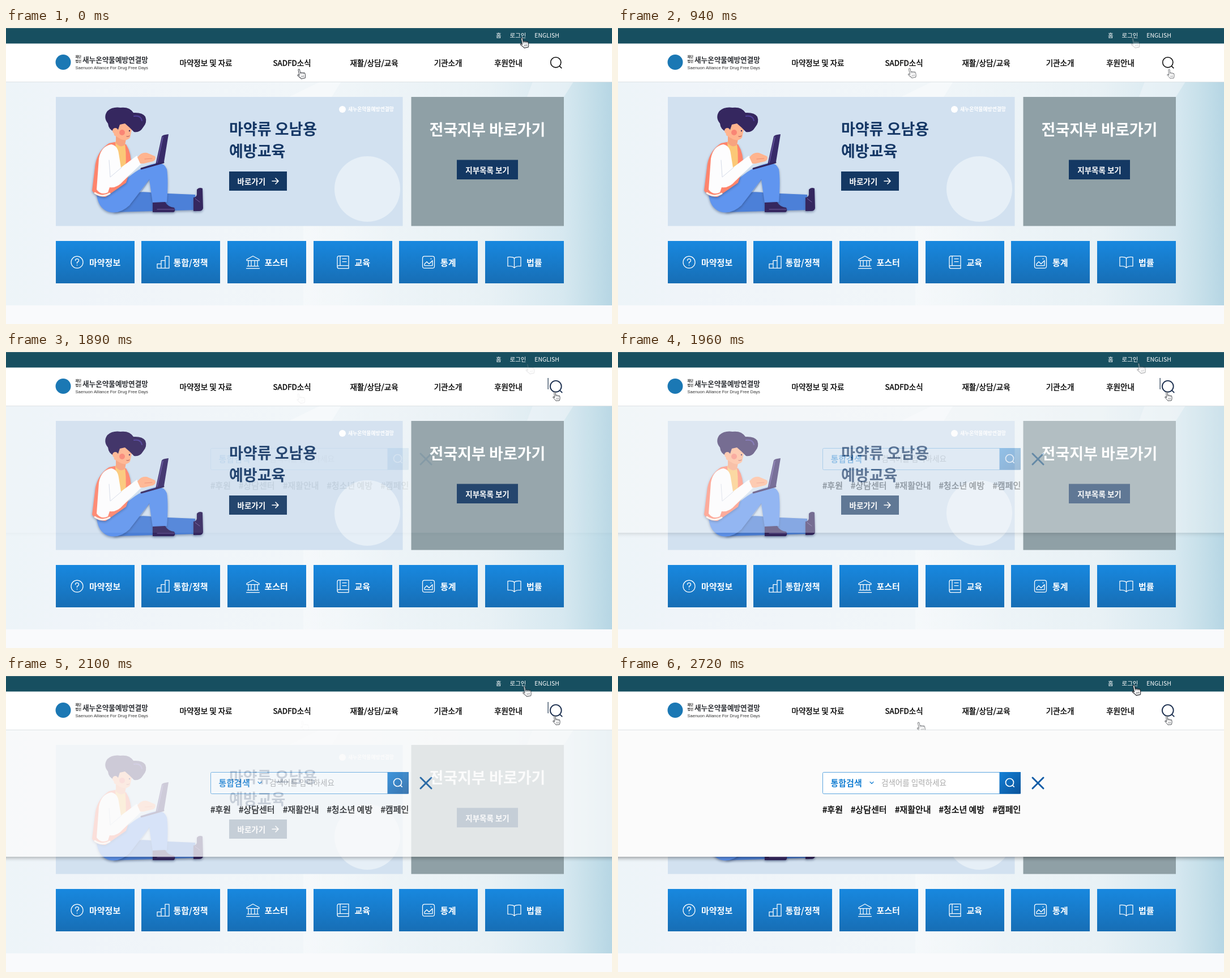
Write an HTML page with a canvas that moves like this. It is 1070 by 524 pixels and loops after 2.79 s.

```html
<!DOCTYPE html>
<html lang="ko">
<head>
<meta charset="utf-8">
<title>통합검색</title>
<style>
  html, body { margin: 0; width: 100%; height: 100%; overflow: hidden; background: #f9fafc; }
  canvas { display: block; width: 1070px; height: 524px; }
</style>
</head>
<body>
<canvas id="stage" width="1070" height="524"></canvas>
<script>
const W = 1070, H = 524, LOOP = 2790;
const FONT = '"Noto Sans CJK KR", "Noto Sans KR", "Noto Sans CJK JP", "Noto Sans", sans-serif';
const NAVY = '#163866';
const ORG = '새누온약물예방연결망';

function layer() {
  const c = document.createElement('canvas');
  c.width = W;
  c.height = H;
  return c.getContext('2d');
}

// Text placed by the vertical middle of its Hangul glyphs.
function label(g, text, x, midY, size, color, weight = 500, align = 'left', family = FONT) {
  const y = midY + size * 0.38;
  g.font = `${weight} ${size}px ${family}`;
  g.textAlign = align;
  g.textBaseline = 'alphabetic';
  g.fillStyle = color;
  g.fillText(text, x, y);
  if (weight === 500) {
    // A hairline thickens regular glyphs to a medium weight.
    g.strokeStyle = color;
    g.lineWidth = size * 0.028;
    g.lineJoin = 'round';
    g.strokeText(text, x, y);
  }
}

function rect(g, x, y, w, h, color) {
  g.fillStyle = color;
  g.fillRect(x, y, w, h);
}

function fill(g, d, color) {
  g.fillStyle = color;
  g.fill(new Path2D(d));
}

function stroke(g, d, color, width) {
  g.strokeStyle = color;
  g.lineWidth = width;
  g.lineCap = g.lineJoin = 'round';
  g.stroke(new Path2D(d));
}

function disc(g, x, y, r, color) {
  g.fillStyle = color;
  g.beginPath();
  g.arc(x, y, r, 0, Math.PI * 2);
  g.fill();
}

function gradient(g, x0, y0, x1, y1, colors) {
  const grad = g.createLinearGradient(x0, y0, x1, y1);
  colors.forEach(([at, color]) => grad.addColorStop(at, color));
  return grad;
}

function magnifier(g, x, y, r, color, width) {
  const k = r * 0.72, end = r * 1.1;
  stroke(g, `M${x + r} ${y}A${r} ${r} 0 1 1 ${x - r} ${y}A${r} ${r} 0 1 1 ${x + r} ${y}
    M${x + k} ${y + k}L${x + end} ${y + end}`, color, width);
}

function drawBackdrop(g) {
  rect(g, 0, 0, W, H, '#f9fafc');
  rect(g, 0, 95, W, 396, gradient(g, 0, 0, W, 0, [
    [0, '#edf4f8'], [0.1, '#eff4f9'], [0.5, '#f1f6f9'], [0.8, '#e8f1f5'],
    [0.92, '#d6e8f0'], [0.96, '#c7e0ea'], [1, '#b6d6e4']
  ]));
  fill(g, 'M500 122L555 95H592L575 122z', 'rgba(255,255,255,.35)');
  fill(g, 'M930 95H1002L985 122H920z', 'rgba(240,246,249,.55)');
  rect(g, 525, 350, 165, 141, gradient(g, 525, 0, 690, 0,
    [[0, 'rgba(255,255,255,.3)'], [1, 'rgba(255,255,255,0)']]));
}

function drawHeader(g) {
  rect(g, 0, 27, W, 68, '#fff');
  rect(g, 0, 0, W, 27.5, '#174f60');
  rect(g, 0, 0, W, 1, '#456f7c');
  label(g, '홈', 865, 13.3, 10.5, '#fff', 400);
  label(g, '로그인', 889.5, 13.3, 10.5, '#fff', 400);
  label(g, 'ENGLISH', 933.3, 13, 10.5, '#fff', 400);

  rect(g, 0, 95, W, 1, '#dde2e5');
  disc(g, 101, 60.5, 13.5, '#1b78b4');
  label(g, '재단', 122.5, 51, 5.8, '#333', 700);
  label(g, '법인', 122.5, 58.5, 5.8, '#333', 700);
  label(g, ORG, 135, 56, 12.6, '#303338', 700);
  label(g, 'Saenuon Alliance For Drug Free Days', 122.5, 70.3, 7.6, '#333', 400, 'left',
    '"Liberation Sans", Arial, sans-serif');

  const menu = [['마약정보 및 자료', 353], ['SADFD소식', 505], ['재활/상담/교육', 650],
    ['기관소개', 780.5], ['후원안내', 887]];
  menu.forEach(([text, x]) => label(g, text, x, 62, 13.5, '#000', 500, 'center'));
}

function drawPerson(g) {
  const skin = '#ffb48f', hair = '#35275f', leg = '#6095ef', white = '#fdfdfe', coral = '#ff846c';
  g.save();
  g.shadowColor = 'rgba(50,70,110,.5)';
  g.shadowBlur = 4;
  g.shadowOffsetY = 2;
  fill(g, 'M196 300Q230 286 262 292L334 295L336 322L190 326z', '#4c80d8');
  fill(g, 'M331 300Q336 300 337 295V286Q341 281 347 284L348 319Q347 324 341 324H331z', hair);
  fill(g, `M160 293Q162 318 180 325Q200 331 218 314L253 268L259 310L284 308
    Q287 270 284 250Q278 236 262 240Q235 246 210 270L180 288z`, leg);
  fill(g, 'M259 309L281 308Q286 317 297 318Q300 324 296 326H259z', hair);
  fill(g, `M182 204Q163 216 158 240L152 288Q160 300 176 299L212 274
    L221 246Q222 222 212 206L192 202z`, coral);
  g.restore();

  fill(g, 'M193 201L210 204Q214 235 209 266L197 264z', '#fbc877');
  fill(g, 'M194 187L213 191L210 207Q202 213 194 204z', '#f7a37f');
  fill(g, 'M188 168H219L222 180L219 194Q213 201 203 197L191 190z', skin);
  fill(g, `M190 183Q181 179 180 169Q171 158 179 147Q188 139 202 141Q218 139 225 150
    Q241 149 246 157Q250 167 242 176Q236 186 226 184L218 176L210 169L201 171L198 180z`, hair);
  stroke(g, 'M226 156Q238 154 240 164', '#50409a', 2);
  disc(g, 193, 182, 5, skin);
  disc(g, 205, 185, 5, '#f98575');
  disc(g, 218, 182, 1.2, hair);
  stroke(g, 'M213 192Q216 193 218 191', '#a94b4d', 1);

  fill(g, `M186 206Q168 209 164 231L160 286Q168 297 180 291L183 282
    Q196 284 207 271L239 240L231 226L203 247L199 222Q197 208 186 206z`, white);
  stroke(g, 'M182 234L184 264L204 247', '#d5dbe8', 1);
  stroke(g, 'M157 292Q170 301 183 293', '#fff0e9', 3);
  fill(g, 'M232 229Q239 219 249 221L263 227Q266 232 260 236L243 240L237 240z', skin);
  stroke(g, 'M245 232L258 231', '#ee8e74', 1);

  fill(g, 'M275 192Q276 189 287 188L279 237L264 242z', '#382b69');
  stroke(g, 'M277 193L267 238', '#6555a0', 1.5);
  stroke(g, 'M239 249L278 238', '#33265f', 3);
  stroke(g, 'M253 268Q238 293 220 312', 'rgba(42,91,184,.35)', 1);
  stroke(g, 'M267 321L297 321M334 302L342 308', '#7563a2', 1);
}

function drawBanner(g) {
  g.save();
  g.beginPath();
  g.rect(88, 122, 612.5, 228.5);
  g.clip();
  rect(g, 88, 122, 613, 229, '#d2e1f0');
  disc(g, 638, 285, 58, '#e6eff7');
  drawPerson(g);
  g.restore();

  disc(g, 594, 144, 6, '#fff');
  label(g, ORG, 604, 143.5, 8.8, '#fff', 700);
  label(g, '마약류 오남용', 394, 179, 27, NAVY, 700);
  label(g, '예방교육', 394, 218, 27, NAVY, 700);
  rect(g, 394, 254, 102, 34, '#143863');
  label(g, '바로가기', 408.5, 272, 13.5, '#fff', 700);
  stroke(g, 'M470 271H481M476 266L481 271L476 276', '#fff', 1.6);

  rect(g, 715.5, 122, 269.5, 228.5, '#8fa0a6');
  label(g, '전국지부 바로가기', 850, 180, 27, '#fff', 700, 'center');
  rect(g, 796, 233.5, 108, 34.5, '#143863');
  label(g, '지부목록 보기', 850, 251.5, 13.5, '#fff', 700, 'center');
}

function drawTiles(g) {
  const tiles = [
    ['마약정보', 125.5, 147, 'M10.5 0A10.5 10.5 0 1 1 -10.5 0A10.5 10.5 0 1 1 10.5 0M-3 -3Q-3 -6 0 -6T3 -3Q3 -1 0 0V2M0 5V5.3'],
    ['통합/정책', 277.5, 295.5, 'M-10.5 10.5V3H-3.5V10.5M-3.5 3V-3H3.5V10.5M3.5 -3V-10.5H10.5V10.5H-10.5'],
    ['포스터', 436, 456.5, 'M-11 -5L0 -11L11 -5V-3H-11zM-8 -3V7M-3 -3V7M3 -3V7M8 -3V7M-10 7H10M-11.5 11H11.5'],
    ['교육', 595, 615.5, 'M-7 -11H10V11H-7Q-10 11 -10 8V-8Q-10 -11 -7 -11zM-5 -11V6M-10 8Q-10 6 -7 6H10M-1 -6H6M-1 -1H6'],
    ['통계', 746, 767, 'M-7 -10.5H7Q10.5 -10.5 10.5 -7V7Q10.5 10.5 7 10.5H-7Q-10.5 10.5 -10.5 7V-7Q-10.5 -10.5 -7 -10.5zM-7 6V3L-3 -1L1 3L7 -3V6zM4 -6H5'],
    ['법률', 897.5, 919, 'M0 -7Q-3 -10 -11.5 -9V7Q-3 6 0 10Q3 6 11.5 7V-9Q3 -10 0 -7zV10']
  ];
  tiles.forEach(([text, iconX, textX, icon], i) => {
    const left = Math.round(87.7 + i * 151.6);
    rect(g, left, 377, 139, 75,
      gradient(g, 0, 377, 0, 452, [[0, '#1888df'], [1, '#176eb5']]));
    g.save();
    g.translate(iconX, 414.7);
    stroke(g, icon, '#fff', 1.25);
    g.restore();
    label(g, text, textX, 415.7, 15, '#fff', 700);
  });
}

function drawSearchPanel(g) {
  g.save();
  g.beginPath();
  g.rect(0, 96, W, 250);
  g.clip();
  g.shadowColor = 'rgba(0,0,0,.4)';
  g.shadowBlur = 7;
  g.shadowOffsetY = 2;
  rect(g, -20, 80, W + 40, 240, '#fbfbfb');
  g.restore();

  g.beginPath();
  g.roundRect(361.5, 170.5, 349, 38, 2);
  g.fillStyle = '#fff';
  g.fill();
  g.strokeStyle = '#5ba5df';
  g.lineWidth = 1;
  g.stroke();
  rect(g, 673.5, 170, 37.5, 38.5,
    gradient(g, 674, 170, 711, 208, [[0, '#1380d7'], [1, '#0a5299']]));
  magnifier(g, 691.5, 188.5, 7, '#fff', 1.7);
  label(g, '통합검색', 375.5, 189.5, 15, '#1780d3', 700);
  stroke(g, 'M445 187.5L448 190.5L451 187.5', '#1780d3', 1.2);
  label(g, '검색어를 입력하세요', 465, 189, 13.5, '#aaa', 400);
  stroke(g, 'M732 180L751 199M751 180L732 199', '#0e5ca6', 3);

  const tags = [['#후원', 361], ['#상담센터', 411], ['#재활안내', 489],
    ['#청소년 예방', 566.5], ['#캠페인', 661.5]];
  tags.forEach(([text, x]) => label(g, text, x, 236, 15, '#000'));
}

const HAND = `M3.2 12V1.6Q3.2 0 4.6 0T6 1.6V7.4Q8.2 6.2 9 8Q11 7 11.9 8.8Q14.5 8 14.5 11
  V13.5Q14.5 16 13 18.8H5.6Q4.5 16.4 2 14L.2 11.6Q-.2 9.6 1.4 10z`;
const KNUCKLES = 'M6 7.4V10M9 8V10.4M11.9 8.8V11M7 13.5V16M9.2 13.5V16M11.4 13.5V16';

function hand(g, [x, y, alpha], scale, tilt, width) {
  if (alpha <= 0) return;
  g.save();
  g.globalAlpha = alpha;
  g.translate(x, y);
  g.rotate(tilt);
  g.scale(scale, scale);
  g.translate(-4.6, 0);
  fill(g, HAND, '#fff');
  stroke(g, HAND, '#1c1f26', width);
  stroke(g, KNUCKLES, '#1c1f26', width * 0.6);
  g.restore();
}

// Keys are [time, ...values], interpolated linearly.
function track(keys, t) {
  if (t <= keys[0][0]) return keys[0].slice(1);
  for (let i = 1; i < keys.length; i++) {
    const a = keys[i - 1], b = keys[i];
    if (t < b[0]) {
      const p = (t - a[0]) / (b[0] - a[0]);
      return a.slice(1).map((v, k) => v + (b[k + 1] - v) * p);
    }
  }
  return keys[keys.length - 1].slice(1);
}

const LOGIN = [[0, 910.5, 17.5, 0.88], [270, 909.5, 17.3, 0.75], [600, 908.5, 17.3, 0.45],
  [1200, 908.5, 17.5, 0.07], [1889, 908.5, 17.5, 0.05], [1890, 920.5, 21, 0.1],
  [1960, 919, 20, 0.35], [2100, 915, 18.5, 0.65], [2380, 911, 17, 0.92], [2720, 910.5, 16.5, 1]];
const NEWS = [[0, 517, 73, 0.85], [270, 515, 71.8, 0.95], [600, 514.5, 71.5, 0.9],
  [1200, 514.5, 71.5, 0.38], [1410, 514.5, 71.5, 0.2], [1690, 515, 73, 0.07],
  [1890, 516, 74, 0.05], [1960, 517, 76, 0], [2440, 537, 89, 0.08], [2720, 530.5, 82, 0.6]];
const SEARCH = [[600, 982, 79, 0], [800, 977, 76, 0.5], [1070, 969, 70.5, 1]];
const PANEL = [[1820, 0], [1890, 0.07], [1960, 0.33], [2100, 0.77], [2240, 0.94], [2380, 1]];

function hold(t) {
  if (t < 1270) return Math.floor(t * 3 / 200 + 0.05) * 200 / 3;
  if (t < 1410) return 1200;
  if (t < 1690) return 1410;
  if (t < 1890) return 1690;
  return 1890 + Math.floor((t - 1890) / 70 + 0.15) * 70;
}

const page = layer(), panel = layer();
[drawBackdrop, drawHeader, drawBanner, drawTiles].forEach(draw => draw(page));
drawSearchPanel(panel);
const stage = document.getElementById('stage').getContext('2d');

function render(time) {
  const t = hold(time);
  stage.globalAlpha = 1;
  stage.drawImage(page.canvas, 0, 0);
  const [shown] = track(PANEL, t);
  if (shown > 0) {
    stage.globalAlpha = shown;
    stage.drawImage(panel.canvas, 0, 0);
    stage.globalAlpha = 1;
  }

  const hover = Math.min(1, Math.max(0, (t - 1070) / 130));
  magnifier(stage, 970.8, 60.8, 9.1 + hover * 0.8, hover > 0.4 ? '#1d3050' : '#111', 1.6 + hover * 0.3);
  if (t >= 1690 && t < 2240) rect(stage, 956.5, 46, 1.3, 20, '#33475f');

  stage.save();
  stage.beginPath();
  stage.rect(0, 0, W, 95.5);
  stage.clip();
  hand(stage, track(NEWS, t), 0.93, -0.2, 1.05);
  stage.restore();
  hand(stage, track(LOGIN, t), 0.98, -0.2, 1.15);
  hand(stage, track(SEARCH, t), 0.85, -0.06, 0.9);
}

const start = performance.now();
function tick() {
  render((performance.now() - start) % LOOP);
  requestAnimationFrame(tick);
}
tick();
</script>
</body>
</html>
```
